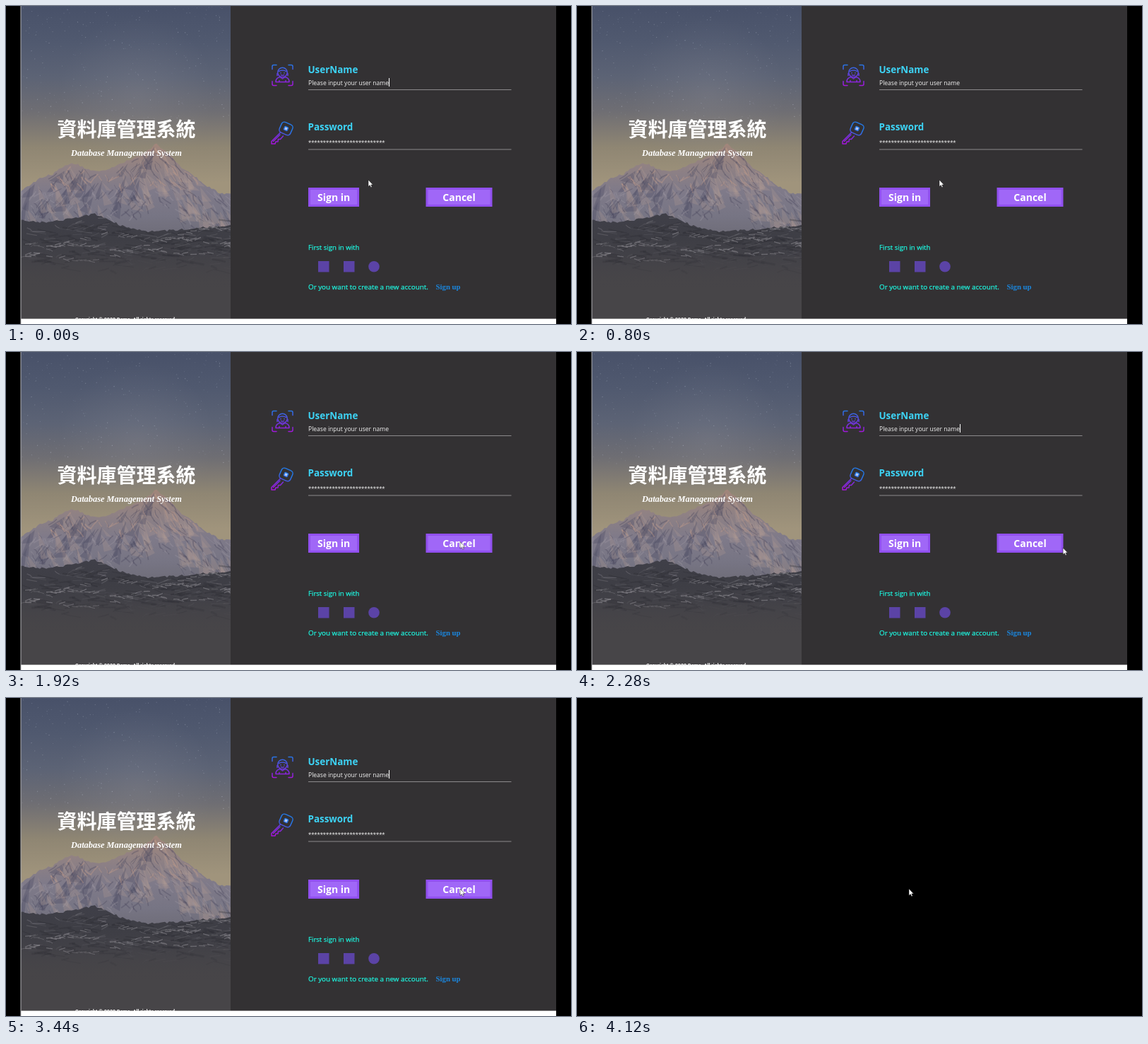
An HTML page with a canvas for the animation above (4.76 s loop, 800 by 450 pixels).

```html
<!DOCTYPE html>
<html lang="en">
<head>
<meta charset="utf-8">
<title>Sign in</title>
<style>
  html, body { margin: 0; width: 100%; height: 100%; overflow: hidden; background: #000; }
  .stage { position: relative; width: 800px; height: 450px; overflow: hidden; background: #000; }
  .screen { position: absolute; inset: 0; animation: close 4760ms step-end infinite; }
  canvas { position: absolute; left: 21px; top: 0; }
  svg { position: absolute; left: 0; top: 0; display: block; }
  text { font-family: "Open Sans", "Noto Sans", sans-serif; fill: #fff; white-space: pre; }
  .title { font: 700 28px "Noto Sans CJK TC", "Noto Sans CJK", sans-serif; }
  .sub { font: italic bold 12.4px "Liberation Serif", serif; }
  .copy { font: bold 7.2px Roboto, sans-serif; }
  .label { font-size: 13.4px; font-weight: 700; fill: #3dd3f5; }
  .input { font-size: 8.55px; fill: #f2f2f2; }
  .mask { font: 9.7px Roboto, sans-serif; fill: #dedede; }
  .hint { fill: #1ef2dc; stroke: #1ef2dc; stroke-width: .25; }
  .link { font: bold 10.8px "Liberation Serif", serif; fill: #1b86dd; }
  .btn text { font-size: 14px; font-weight: 700; text-anchor: middle; }
  .btn rect { fill: #a067f7; stroke: #9150ef; stroke-width: 3; }
  .icon { fill: none; stroke: url(#neon); stroke-width: 1.5; stroke-linecap: round; stroke-linejoin: round; }
  .caret { fill: #fff; animation: blink 4760ms step-end infinite; }
  .press { animation: press 4760ms step-end infinite; }
  .cursor { animation: move 4760ms linear infinite; }

  @keyframes close { 0% { visibility: visible } 86.54%, 100% { visibility: hidden } }
  @keyframes blink {
    0%, 19.12%, 41.39%, 63.66% { opacity: 1 }
    7.98%, 30.25%, 52.52%, 74.79%, 100% { opacity: 0 }
  }
  @keyframes press {
    0% { fill: #a067f7; stroke: #9150ef }
    79.8%, 100% { fill: #9658fa; stroke: #9355f8 }
  }
  @keyframes move {
    0%, 27.3% { transform: translate(513px, 246px) }
    31.09% { transform: translate(517px, 247px) }
    35.29% { transform: translate(613px, 263px) }
    47.9% { transform: translate(688px, 277px) }
    52.52% { transform: translate(714px, 279px) }
    57.98% { transform: translate(683px, 276px) }
    70.59%, 86.53% { transform: translate(643px, 270px) }
    86.54%, 100% { transform: translate(470px, 270px) }
  }
</style>
</head>
<body>
<div class="stage">
  <div class="screen">
    <canvas id="photo" width="297" height="443"></canvas>
    <svg width="800" height="450" viewBox="0 0 800 450">
      <defs>
        <linearGradient id="neon" gradientUnits="userSpaceOnUse" x1="0" y1="0" x2="0" y2="32">
          <stop offset="0" stop-color="#2478e6"/>
          <stop offset=".5" stop-color="#663bdc"/>
          <stop offset="1" stop-color="#aa12dc"/>
        </linearGradient>
        <clipPath id="window"><rect x="21" width="758" height="443.5"/></clipPath>
      </defs>
      <rect x="318" width="461" height="443" fill="#333133"/>
      <rect x="21" y="442.6" width="758" height="7.4" fill="#fff"/>
      <rect x="20.5" width="1" height="450" fill="#b4b4b8"/>

      <text class="title" x="72.5" y="184.5">資料庫管理系統</text>
      <text class="sub" x="92" y="211.5">Database Management System</text>
      <g clip-path="url(#window)"><text class="copy" x="98" y="445.5">Copyright © 2020 Demo. All rights reserved.</text></g>

      <g class="icon" transform="translate(376 82.5)">
        <path d="M1 7V3Q1 1 3 1H7M24 1h4q2 0 2 2v4M1 24v4q0 2 2 2h4M24 30h4q2 0 2-2v-4"/>
        <circle cx="15.5" cy="11.5" r="6.8"/>
        <path d="M10 10q5.500-3 11 0M13 12v.6M18 12v.6M13.500 15q2 1.500 4 0M8 13v3M23 13v3"/>
        <path d="M6 25q0-6 6-7l3.500 2.500L19 18q6 1 6 7ZM11 25v-2M20 25v-2"/>
      </g>
      <g class="icon" transform="translate(375 163.500)">
        <rect x="-8.500" y="-8" width="17" height="16" rx="4.500" transform="translate(21.500 10) rotate(24)"/>
        <path d="M13.500 15.500L1 28v3.500h5l1-3h3l.500-3.500h3l4-4.500M13 18.500L3.500 28"/>
        <rect x="-2.500" y="-2.500" width="5" height="5" rx="1" fill="#b9c8ee" transform="translate(21.500 10) rotate(24)"/>
      </g>

      <text class="label" x="427.5" y="95">UserName</text>
      <text class="input" x="428" y="111.500">Please input your user name</text>
      <rect class="caret" x="542" y="102" width="1" height="12"/>
      <text class="label" x="427.5" y="176">Password</text>
      <text class="mask" x="428" y="196.500">**************************</text>
      <path d="M428 118.500H715.500M428 203H715.500" stroke="#8c8a8c"/>

      <g class="btn">
        <rect x="429.500" y="258.500" width="69" height="24"/>
        <text x="464.200" y="276.300">Sign in</text>
        <rect class="press" x="596" y="258.500" width="91" height="24"/>
        <text x="641.500" y="276.300">Cancel</text>
      </g>

      <text class="hint" x="428" y="345" font-size="9.6">First sign in with</text>
      <g fill="#5b43a6">
        <rect x="442" y="361" width="15.500" height="15.500"/>
        <rect x="478" y="361" width="15.500" height="15.500"/>
        <circle cx="521" cy="368.700" r="7.800"/>
      </g>
      <text class="hint" x="428" y="401" font-size="9.8">Or you want to create a new account.</text>
      <text class="link" x="608.500" y="401">Sign up</text>
    </svg>
  </div>
  <svg width="800" height="450" viewBox="0 0 800 450">
    <path class="cursor" d="M0 0V9.600L2.200 7.600 3.700 10.700 5.200 10 3.800 7H6.600Z" fill="#fff" stroke="#111" stroke-width=".5"/>
  </svg>
</div>
<script>
  const ctx = document.getElementById('photo').getContext('2d');
  const W = 297, H = 443;
  let seed = 17;
  const rand = () => (seed = seed * 16807 % 2147483647) / 2147483647;
  const between = (a, b) => a + (b - a) * rand();

  function vertical(y0, y1, ...colors) {
    const g = ctx.createLinearGradient(0, y0, 0, y1);
    colors.forEach((c, i) => g.addColorStop(i / (colors.length - 1), c));
    return g;
  }

  function heightAt(points, x) {
    const i = Math.max(1, points.findIndex(p => p[0] >= x));
    const [x0, y0] = points[i - 1], [x1, y1] = points[i];
    return y0 + (y1 - y0) * (x - x0) / (x1 - x0);
  }

  // Fills everything below a roughened skyline.
  function hill(points, rough, fill) {
    ctx.beginPath();
    ctx.moveTo(0, H);
    for (let x = 0; x <= W; x += 3) ctx.lineTo(x, heightAt(points, x) + between(-rough, rough));
    ctx.lineTo(W, H);
    ctx.fillStyle = fill;
    ctx.fill();
  }

  function streak(x, y, dx, dy, color, width) {
    ctx.beginPath();
    ctx.moveTo(x, y);
    ctx.lineTo(x + dx * .5 + between(-2, 2), y + dy * .5);
    ctx.lineTo(x + dx, y + dy);
    ctx.strokeStyle = color;
    ctx.lineWidth = width;
    ctx.stroke();
  }

  function facet(x, y, dx, dy, color) {
    ctx.beginPath();
    ctx.moveTo(x, y);
    ctx.lineTo(x + dx, y + dy);
    ctx.lineTo(x + dx * between(.1, .5), y + dy * between(.8, 1.3));
    ctx.fillStyle = color;
    ctx.fill();
  }

  ctx.fillStyle = vertical(0, 250, '#485169', '#50596f', '#5c6375', '#6f6e73', '#8f8673', '#a0947c');
  ctx.fillRect(0, 0, W, 300);

  const glow = ctx.createRadialGradient(165, 125, 5, 165, 125, 110);
  glow.addColorStop(0, 'rgba(150,150,160,.2)');
  glow.addColorStop(1, 'rgba(150,150,160,0)');
  ctx.fillStyle = glow;
  ctx.fillRect(0, 0, W, 240);

  for (let i = 0; i < 320; i++) {
    ctx.fillStyle = `rgba(205,212,228,${between(.08, .4)})`;
    const size = between(.5, 1.2);
    ctx.fillRect(between(0, W), between(0, 165), size, size);
  }

  const ridge = [[0, 262], [28, 243], [45, 238], [64, 225], [74, 222], [92, 229], [110, 235], [128, 229],
    [145, 221], [165, 213], [182, 203], [191, 194], [200, 202], [212, 210], [226, 228], [245, 240],
    [262, 254], [280, 264], [297, 267]];
  hill(ridge, 1.5, vertical(195, 330, '#a1867a', '#8f8184', '#7f7a89', '#777584', '#6d6b76'));

  for (let i = 0; i < 110; i++) {
    const x = between(0, W), y = heightAt(ridge, x) + between(1, 55);
    const lean = x > 191 ? 1 : rand() < .5 ? -1 : 1;
    const color = lean > 0 ? 'rgba(176,154,148,.28)' : 'rgba(72,72,96,.32)';
    facet(x, y, lean * between(8, 24), between(14, 32), color);
  }

  for (let i = 0; i < 300; i++) {
    const x = between(0, W), y = heightAt(ridge, x) + between(2, 80);
    const lean = x > 191 ? 1 : rand() < .5 ? -1 : .7;
    const color = rand() < .5
      ? (y < 255 ? 'rgba(192,156,138,.4)' : 'rgba(156,150,162,.36)')
      : 'rgba(74,72,94,.36)';
    streak(x, y, lean * between(4, 13), between(5, 14), color, between(.6, 2));
  }

  const mid = [[0, 303], [30, 306], [60, 303], [85, 298], [104, 294], [120, 300], [145, 312],
    [180, 319], [220, 317], [260, 313], [297, 311]];
  hill(mid, 1.5, vertical(294, 400, '#3f3f48', '#3e3e45', '#434248', '#474548'));

  for (let i = 0; i < 130; i++) {
    const x = between(0, W), y = heightAt(mid, x) + between(4, 60);
    const fade = Math.max(.08, .5 - (y - 315) / 150);
    streak(x, y, between(6, 24), between(-7, 5), `rgba(134,132,139,${fade * .7})`, between(.4, 1.5));
    streak(between(0, W), y + 2, between(8, 26), between(-5, 6), 'rgba(44,44,51,.3)', between(1, 3));
  }

  // Snow edges along the lower slopes.
  for (let k = 0; k < 3; k++) {
    for (let x = 0; x < W; x += 6) {
      const y = 336 + k * 12 - x * .06 + 6 * Math.sin(x / 24 + k * 2);
      if (rand() < .65) streak(x, y, 9, between(-4, 4), 'rgba(152,150,156,.5)', between(.6, 1.6));
    }
  }

  ctx.fillStyle = vertical(350, 402, 'rgba(71,69,72,0)', '#474548');
  ctx.fillRect(0, 350, W, 93);
</script>
</body>
</html>
```
